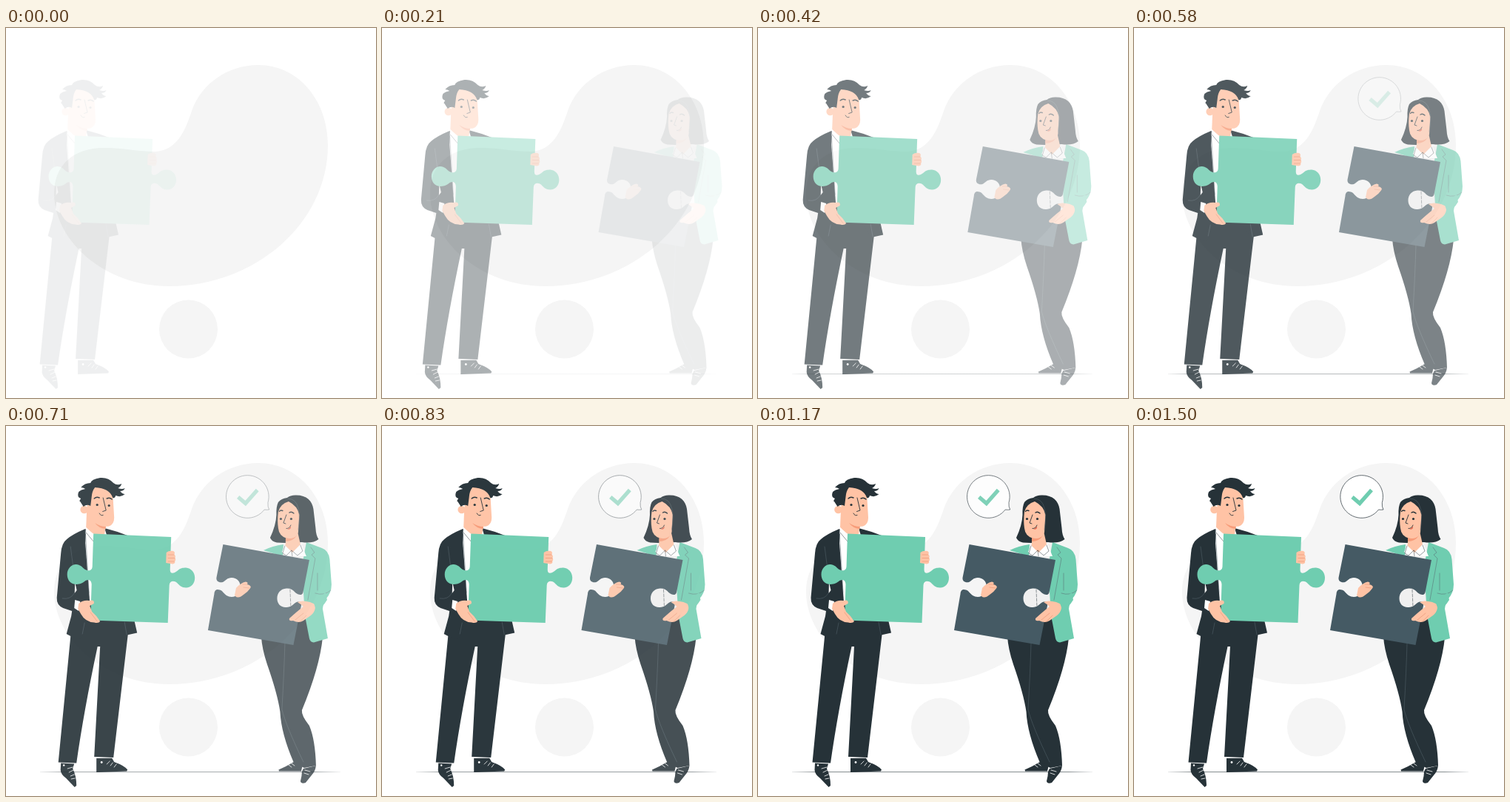
Animation of 500 by 500 pixels, one loop 1540 ms. Source, as an HTML page:

```html
<!DOCTYPE html>
<html lang="en">
<head>
<meta charset="utf-8">
<title>Puzzle teamwork</title>
<style>
  html, body { margin: 0; width: 100%; height: 100%; overflow: hidden; background: #fff; }
  svg { display: block; width: 100%; height: 100%; }
  .dark { fill: #263238; }
  .slate { fill: #455a64; }
  .green { fill: #6fcdb0; }
  .skin { fill: #ffc3a5; }
  .shade { fill: #f79c79; }
  .pale { fill: #f5f5f5; }
  .shirt { fill: #f0f0f0; }
  .white { fill: #fff; }
  .ink, .brow, .thin, .seam, .lace, .fold { fill: none; stroke: #263238; stroke-linecap: round; stroke-linejoin: round; }
  .ink { stroke-width: .9; }
  .brow { stroke-width: 1.4; }
  .thin { stroke-width: .5; }
  .seam { stroke: #56666e; stroke-width: .5; }
  .lace { stroke: #fff; stroke-width: .8; }
  .fold { stroke: #e8906f; stroke-width: .6; }
</style>
</head>
<body>
<svg viewBox="0 0 500 500">
  <defs>
    <linearGradient id="taper" gradientUnits="userSpaceOnUse" x1="46" x2="452" y1="0" y2="0">
      <stop offset="0" stop-color="#263238" stop-opacity=".15"/>
      <stop offset=".08" stop-color="#263238" stop-opacity=".75"/>
      <stop offset=".92" stop-color="#263238" stop-opacity=".75"/>
      <stop offset="1" stop-color="#263238" stop-opacity=".1"/>
    </linearGradient>
  </defs>

  <g class="pale">
    <path d="M341 50C395 50 435 98 435 158C435 265 335 349 221 349C130 349 65 285 65 224C65 186 90 162 133 162C158 162 178 167 201 167C230 166 242 140 251 112C264 75 300 50 341 50Z"/>
    <circle cx="246.5" cy="407" r="39.5"/>
  </g>
  <path data-from="0" data-delay="200" d="M46 467.1H452V467.8H46Z" fill="url(#taper)"/>

  <g data-from="-30" data-delay="0">
    <path class="dark" d="M92 262L90 285L73.500 454.500L98 455.500Q108 385 126.500 298H130L122 447L148 448L168 278L165 255Z"/>
    <path class="dark" d="M110 139Q93 146 85 153Q78 158 77 172L71.500 232Q71 242 80 246L92 250L91 257L84.500 281Q95 287 104 288Q109 281 112 264L119 262L121 150ZM136 138Q152 142 167 148L140 151ZM150 262L164 283L180 279.500L176 262Z"/>
    <path class="white" d="M111 138L123 147L119 240L116 238L110 158Z"/>
    <path class="pale" d="M96 211L98.500 222L95.500 226Z"/>
    <path class="skin" d="M112 112L111 137Q118 147 130 148L136 146L138 134Z"/>
    <path class="white" d="M111 137L122 147L121 157L110 145Z"/>
    <path class="thin" d="M111 144L121 156"/>
    <circle class="skin" cx="108.500" cy="113" r="5.300"/>
    <path class="skin" d="M113 92L124 79L147 90L149 124Q149 133 142 135.500Q132 137 123 129L112 120Z"/>
    <path class="shade" d="M123 131Q130 136 138 136L137 139Q128 138 123 131Z"/>
    <path class="brow" d="M122 98Q125 95 129 97M139 98Q143 96 146 99"/>
    <path class="ink" d="M134 97L138 114L133.500 115.500M129 118Q131 122 134 120.500"/>
    <circle class="dark" cx="126" cy="106.500" r="1.600"/>
    <circle class="dark" cx="142" cy="107.500" r="1.600"/>
    <path class="seam" d="M90 163Q93 188 97 213M110 141L115 225M95 226Q90 235 79 233M109 266L106 281M163 265L166 282"/>
    <path class="green" d="M121 145.500L226 150L224.500 194C224.500 201 230 199 234 196C238 192 242 191.500 246 191.500C253 192 258 198 258 205C258 213 253 218.500 246 218.500C240 218.500 237 215 234 212C230 208.500 224 209 223.500 215L221.500 266L117 262.500L118.500 214C118 207 113 207 109 210C105 213.500 101 214 97 214C90 213.500 85.500 208 85.500 200.500C85.500 193 91 187 97.500 187C103 187 106 191 109 193.500C114 196.500 119 196 119.500 190Z"/>
    <path class="white" d="M96 235L103 237L101 250L95 246Z"/>
    <path class="skin" d="M101 240Q107 235 115 236Q123 234 121.500 240L116 243L119 251Q126 257 130 264Q128 267 122 265.500Q110 265 104 254L100 247Z"/>
    <path class="skin" d="M219.500 171Q223 168 229 169Q232 171 230 173.500Q233 176 231 178Q233 181 231 182.500Q232 186 228 186.500L219 185Z"/>
    <path class="fold" d="M222 174H230M222 178.500H231M222 183H230M117 252L126 264"/>
    <path class="dark" d="M107.500 109L103 102Q101 102 104 98Q98 96 101 89Q104 86 110 85Q107 83 104 83Q109 77 117 77Q118 72 130 70Q141 69 148 77Q153 81 159 78Q158 82 154 84Q160 86 163.500 84Q162 88 157 88Q160 92 163.500 92Q158 97 151 94Q150 98 147 97Q143 84 123 83Q119 88 118.500 96L117 108Q112 105 107.500 109Z"/>
    <path class="dark" d="M77 455.500L95 456.500L93 463Q98 473 98 486L95.500 488L84 476Q77 471 76.500 465ZM125 449L146 448.800L149 454Q163 459 167 464.500L166 466.500L125 468Z"/>
    <path class="lace" d="M86 463L93 461M88 468L94 465M90 473L95 471M91 477L96 476M139 457L143 453M144 459L147 455M149 461L152 457"/>
    <circle class="white" cx="81" cy="458.500" r="1.200"/>
    <circle class="white" cx="132" cy="454.500" r="1.400"/>
  </g>

  <g data-from="30" data-delay="200">
    <path class="dark" d="M337 284Q338 301 345 322Q359 362 362.500 386Q364 416 381 455L395 462L411 459Q410 424 402 405Q391 391 392 384Q416 326 420 286L400 255L372 260Z"/>
    <path class="seam" d="M369 294Q368 330 365 383Q370 404 394 454"/>
    <path class="shirt" d="M366 161L397 160L398 250L357 246L358 200Z"/>
    <path class="green" d="M367 160Q352 162 340 168L366 176ZM398 157L419 165Q428 168 429.500 180L432 214Q432 226 424 234Q421 239 420 247L427 287L408 292.500Q403 292 402 287L396 256L392 190Z"/>
    <path class="dark" d="M372 97Q376 93.500 383 93.500C398 93 406 101 407.500 112L410.500 138Q411 148 414.500 153Q407 159 392 157L369 158L358 157.500Q351 156 349 151Q357 134 357.500 120Q357 109 360 103Q364 98 372 97Z"/>
    <path class="skin" d="M371 142L369.500 163L379 174L390 160L386 142Z"/>
    <path class="skin" d="M374 102Q386 108 388.500 120L387 144Q381 153 372 152Q361 149 360 138Q358.500 128 360 116Q363 105 374 102Z"/>
    <path class="shade" d="M370 151Q379 154 385 148Q380 156 370 156Z"/>
    <path class="brow" d="M361.500 115.500Q363 113 366 114.500M375 117Q378 115 381 118"/>
    <path class="ink" d="M371 120L367 131L370 132M371 138.500Q375 139 377 134"/>
    <path d="M372 139Q376 138 377 135L377 138Q375 141 372 139Z" fill="#e5694f"/>
    <circle class="dark" cx="363.500" cy="125.500" r="1.600"/>
    <circle class="dark" cx="377.500" cy="125.500" r="1.600"/>
    <path class="seam" d="M373 98Q384 98 387 111Q390 122 387 140"/>
    <path class="white" d="M369 161L379 171L391 159L398 176L370 176L365 170Z"/>
    <path class="thin" d="M369 162L366 172L371 175L378 168L386 175L393 169L390 161M378 168L379 176"/>
    <path class="slate" d="M285.500 160L402 181L393.500 225C392 230 387 228 383 225C380 221 376 219 371 219.500C363 220 358.500 226 358.500 233C358.500 240 363 245 370 245C377 245.500 380 241 383 239C388 236 392 238 391 243L380.500 296L265 276L273.500 227C274 220 279 220 284 223C288 228 292 231 297 231C304 231 309 226 309 218C309 210 304 205 297 205C291 205 289 209 285 211C280 212 276 210 276.500 205Z"/>
    <path class="thin" d="M376 221L377 245" stroke-dasharray="4 2"/>
    <path class="seam" d="M404 164L409 171L405 174L410 179L400 235M413 199L413 222M431 222Q422 230 410 226"/>
    <path class="skin" d="M301 229L303 219Q309 212 316 210.500Q320 211 318 214Q325 216 322 219.500Q319 224 313 228Q306 234 302 230Z"/>
    <path class="skin" d="M410 241L403 238Q392 235 386 238Q391 241 394 244Q386 250 375 260Q374 264 380 263Q388 267 394 263L404 256Q409 252 410 246Z"/>
    <path class="fold" d="M312 214L318 214M313 218L321 219M383 262L394 253M390 264L398 256"/>
    <path class="green" d="M407 238L424 225L426 235Q420 245 410 252Q411 244 407 238Z"/>
    <path class="dark" d="M381 454L393 458L391 466.500H361L360.500 464.500Q371 460 381 454ZM394 463L411 459Q410 467 405 472L397 482Q391 484 390 480Q392 473 392 467Z"/>
    <path class="lace" d="M374 458L378 461M378 456L382 459M396 465L403 467M395 469L401 471"/>
  </g>

  <g data-from="30" data-delay="500">
    <path class="white" d="M335 104Q334.500 110 337 113Q333 113.500 330 112Z"/>
    <path d="M335.300 103.500Q334.800 109.500 337 113Q333.500 113.500 330.500 113A28.800 28.800 0 1 1 335.300 103.500Z" fill="#fff" stroke="#263238" stroke-width=".7"/>
    <path d="M295 96L305 104.500L321 86.500" fill="none" stroke="#6fcdb0" stroke-width="5.200"/>
  </g>
</svg>
<script>
  const LOOP = 1540, STEP = 1000 / 24, SLIDE = 1000;
  const parts = [...document.querySelectorAll('[data-from]')];
  const clamp = v => Math.min(1, Math.max(0, v));

  // cubic-bezier(0, 0, .58, 1)
  function easeOut(x) {
    let lo = 0, hi = 1;
    for (let i = 0; i < 20; i++) {
      const s = (lo + hi) / 2;
      if (1.74 * s * s - 0.74 * s ** 3 < x) lo = s; else hi = s;
    }
    return 3 * lo * lo - 2 * lo ** 3;
  }

  function draw() {
    // The picture advances at 24 steps a second, on 10 ms ticks.
    const t = (Math.floor((performance.now() % LOOP + 5) / STEP) + 1) * STEP;
    for (const el of parts) {
      const p = easeOut(clamp((t - el.dataset.delay) / SLIDE));
      el.setAttribute('transform', `translate(${(1 - p) * el.dataset.from} 0)`);
      el.setAttribute('opacity', p);
    }
    requestAnimationFrame(draw);
  }
  draw();
</script>
</body>
</html>
```
